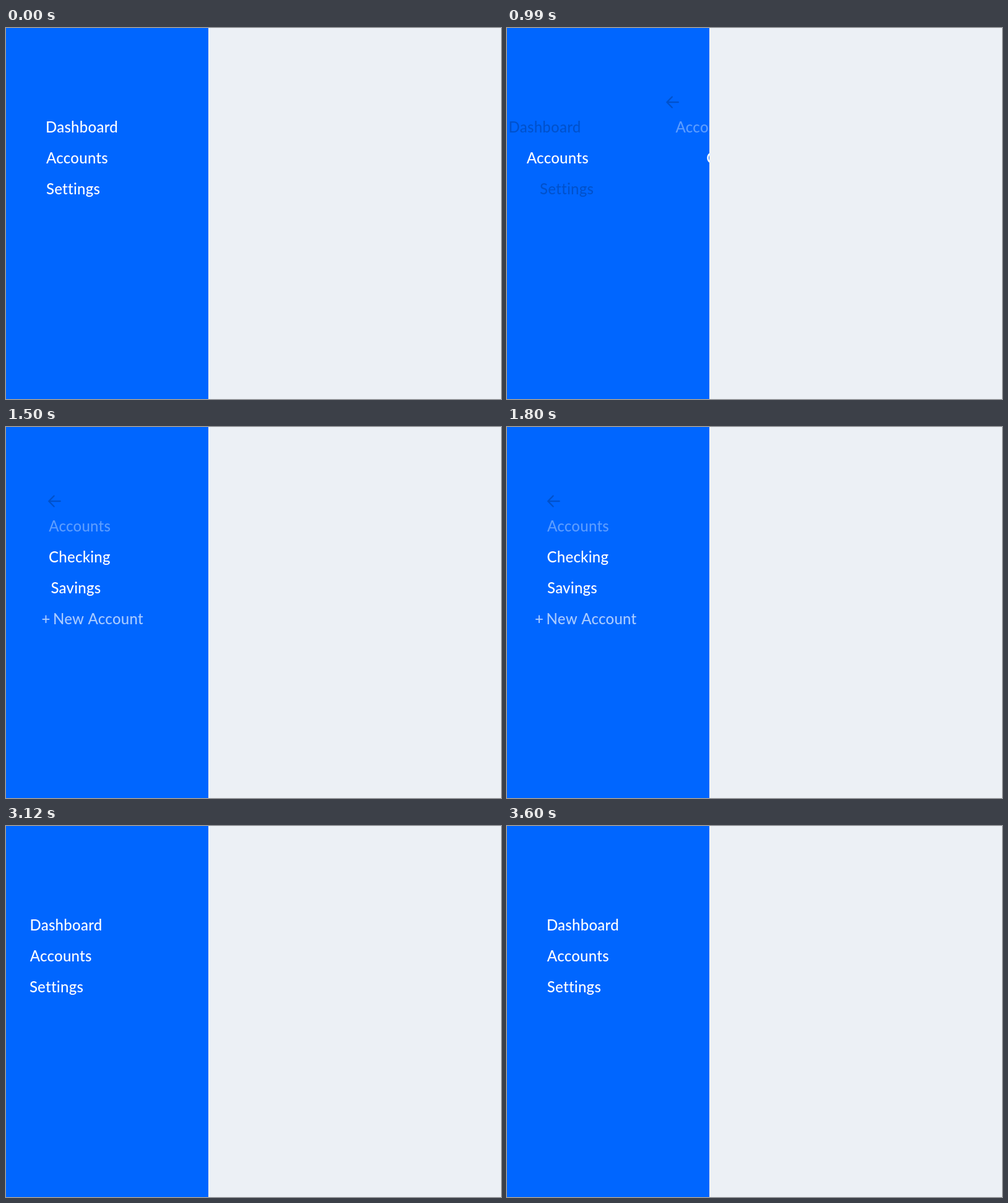
Recreate the animation shown at these times as an HTML page with a canvas. Size 800 by 600 pixels, loop 3630 ms.

```html
<!DOCTYPE html>
<html lang="en">
<head>
<meta charset="utf-8">
<title>Sidebar menu</title>
<style>
  html, body { margin: 0; width: 100%; height: 100%; overflow: hidden; background: #ecf0f5; }
  canvas { display: block; width: 800px; height: 600px; }
</style>
</head>
<body>
<canvas id="stage" width="800" height="600"></canvas>
<script>
const ctx = document.getElementById('stage').getContext('2d');
const LOOP = 3630, STEP = 30, EDGE = 327;
const HOVER_ITEM = 480, HOVER_BACK = 2280, CLICK_BACK = 2550;
const WHITE = '#fff', DIM = 'rgba(0,0,0,0.2)', FAINT = 'rgba(255,255,255,0.36)', SOFT = 'rgba(255,255,255,0.66)';

// Times in ms: when an item leaves, when it comes in, and how long the entry takes.
const mainMenu = [
  { text: 'Dashboard', x: 66, y: 169, leave: 809, enter: 2685, span: 1081 },
  { text: 'Accounts', x: 65, y: 219, leave: 857, enter: 2690, span: 1081, picked: true },
  { text: 'Settings', x: 65, y: 269, leave: 910, enter: 2695, span: 1081 }
];
const subMenu = [
  { arrow: true, x: 65, y: 120, color: DIM, enter: 897, span: 883, leave: 2641 },
  { text: 'Accounts', x: 65, y: 169, color: FAINT, enter: 911, span: 898, leave: 2639 },
  { text: 'Checking', x: 65.5, y: 219, color: WHITE, enter: 959, span: 833, leave: 2639 },
  { text: 'Savings', x: 65, y: 269, color: WHITE, enter: 963, span: 890, leave: 2639 },
  { text: 'New Account', plus: true, x: 65.5, y: 319, color: SOFT, enter: 979, span: 950, leave: 2635 }
];

const clamp = v => Math.min(1, Math.max(0, v));
const easeIn = (t, start, span) => clamp((t - start) / span) ** 2;
const remaining = (t, start, span) => (1 - clamp((t - start) / span)) ** 4;

// Places the visible left edge of the text at x.
function label(text, x, y) {
  const left = x + ctx.measureText(text).actualBoundingBoxLeft;
  ctx.fillText(text, left, y);
}

function arrow(x, y) {
  ctx.lineWidth = 2.5;
  ctx.beginPath();
  ctx.moveTo(x + 19.5, y);
  ctx.lineTo(x + 1.5, y);
  ctx.moveTo(x + 9.5, y - 8.5);
  ctx.lineTo(x + 1.2, y);
  ctx.lineTo(x + 9.5, y + 8.5);
  ctx.stroke();
}

function item(it, dx, color, alpha = 1) {
  ctx.globalAlpha = alpha;
  ctx.fillStyle = ctx.strokeStyle = color;
  if (it.arrow) {
    arrow(it.x + dx, it.y);
  } else {
    label(it.text, it.x + dx, it.y);
    if (it.plus) label('+', it.x + dx - 19.5, it.y);
  }
  ctx.globalAlpha = 1;
}

function drawMain(t) {
  for (const it of mainMenu) {
    if (t < 1500) {
      const color = t >= HOVER_ITEM && !it.picked ? DIM : WHITE;
      item(it, -300 * easeIn(t, it.leave, 400), color);
    } else if (t >= it.enter) {
      item(it, -200 * remaining(t, it.enter, it.span), WHITE);
    }
  }
}

function drawSub(t) {
  for (const it of subMenu) {
    if (t < it.enter || t > it.leave + 400) continue;
    const dx = 300 * remaining(t, it.enter, it.span) + 300 * easeIn(t, it.leave, 400);
    const lit = it.arrow && t >= HOVER_BACK && t < CLICK_BACK;
    item(it, dx, lit ? WHITE : it.color, 1 - easeIn(t, it.leave, 300));
  }
}

function draw(t) {
  ctx.fillStyle = '#ecf0f5';
  ctx.fillRect(0, 0, 800, 600);
  ctx.fillStyle = '#0066ff';
  ctx.fillRect(0, 0, EDGE, 600);
  ctx.save();
  ctx.beginPath();
  ctx.rect(0, 0, EDGE, 600);
  ctx.clip();
  ctx.font = '500 24px Lato, sans-serif';
  ctx.letterSpacing = '0.25px';
  ctx.lineCap = ctx.lineJoin = 'round';
  drawMain(t);
  drawSub(t);
  ctx.restore();
}

function tick() {
  const t = performance.now() % LOOP;
  draw(Math.floor(t / STEP) * STEP);
  requestAnimationFrame(tick);
}
tick();
</script>
</body>
</html>
```
